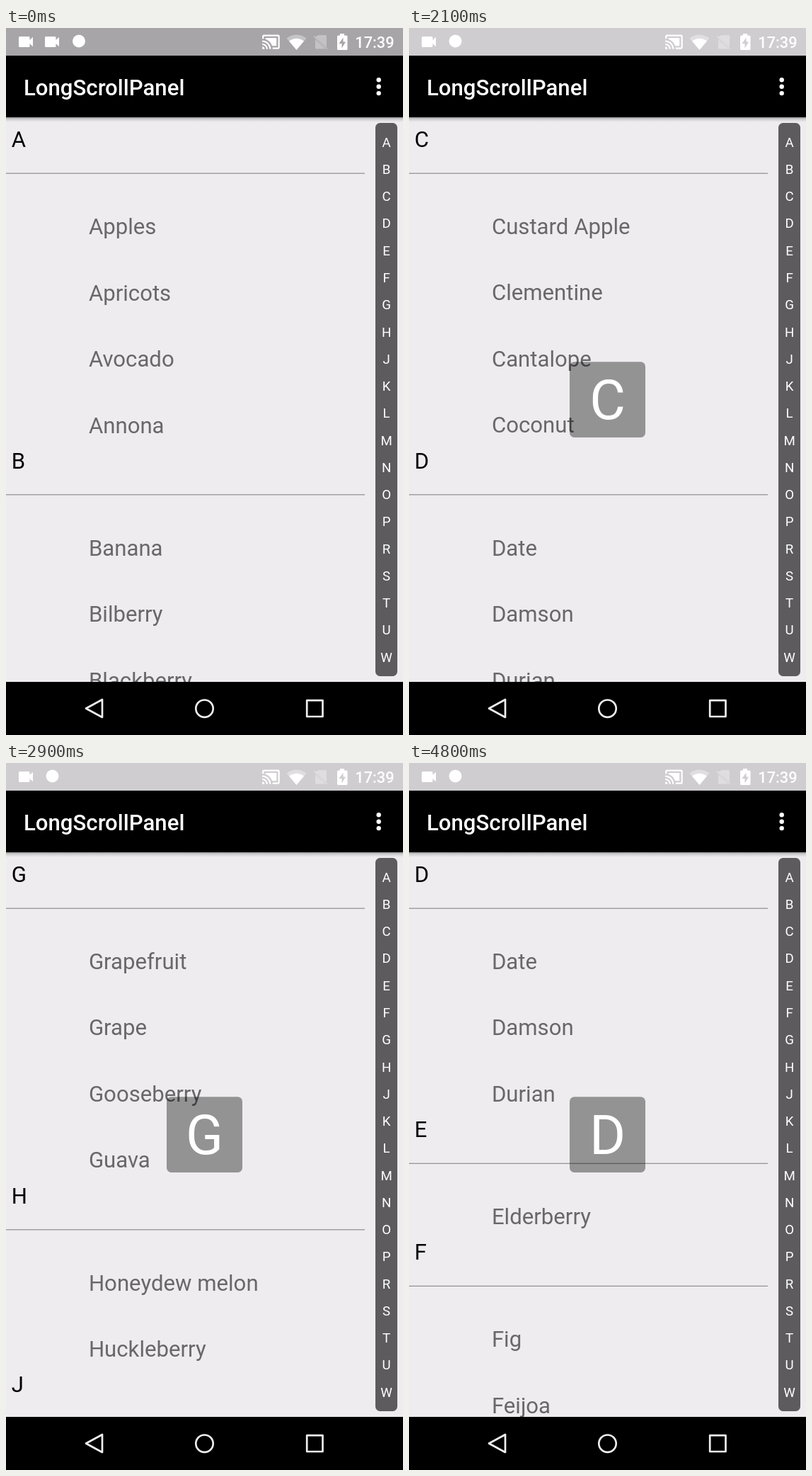
Animation of 561x998 px, one loop 5.1 s. Source, as an HTML page:

```html
<!DOCTYPE html>
<html lang="en">
<head>
<meta charset="utf-8">
<title>Fruit index</title>
<style>
html, body { margin: 0; width: 100%; height: 100%; overflow: hidden; background: #eeecef; }
svg { display: block; width: 561px; height: 998px; font-family: Roboto, "Noto Sans", sans-serif; }
.row { font-size: 31.17px; }
.item { fill: #69676a; }
.side { font-size: 18.7px; fill: #fff; text-anchor: middle; }
</style>
</head>
<body>
<svg viewBox="0 0 561 998" xmlns="http://www.w3.org/2000/svg">
  <defs>
    <linearGradient id="shade" x1="0" y1="0" x2="0" y2="1">
      <stop offset="0" stop-color="#000" stop-opacity=".36"/>
      <stop offset=".4" stop-color="#000" stop-opacity=".12"/>
      <stop offset="1" stop-color="#000" stop-opacity="0"/>
    </linearGradient>
    <path id="camera" d="M1.5 0H14q1.5 0 1.5 1.5V5L20 .8V14.2L15.5 10V13.500q0 1.500-1.500 1.500H1.500Q0 15 0 13.500V1.500Q0 0 1.500 0Z"/>
  </defs>
  <rect width="561" height="998" fill="#eeecef"/>
  <g id="list"></g>
  <rect y="126" width="561" height="7" fill="url(#shade)"/>

  <rect x="522" y="134" width="31" height="781" rx="6.500" fill="#5d5b5e"/>
  <g id="index"></g>

  <g id="bubble">
    <rect x="227" y="471.300" width="107" height="106.700" rx="6.500" fill="#000" fill-opacity=".38"/>
    <text id="big" x="280.500" y="552" font-size="77.900" fill="#fff" text-anchor="middle"></text>
  </g>

  <rect id="status" width="561" height="39.500"/>
  <g fill="#fff">
    <use href="#camera" x="18" y="12"/>
    <use id="second" href="#camera" x="55" y="12"/>
    <circle id="dot" cy="18.500" r="9"/>
    <path transform="translate(361 6.200) scale(1.120)" d="M1 18v3h3c0-1.660-1.340-3-3-3zm0-4v2c2.760 0 5 2.240 5 5h2c0-3.870-3.130-7-7-7zm18-7H5v1.630c3.960 1.280 7.090 4.410 8.370 8.370H19V7zM1 10v2c4.970 0 9 4.030 9 9h2c0-6.080-4.930-11-11-11zm20-7H3c-1.100 0-2 .9-2 2v3h2V5h18v14h-7v2h7c1.100 0 2-.9 2-2V5c0-1.100-.9-2-2-2z"/>
    <path d="M396.500 14.500Q410.500 4.500 424.500 14.500L410.500 31Z" opacity=".35"/>
    <path d="M400 18.500Q410.500 11 421 18.500L410.500 31Z"/>
    <path d="M442 10H451.500Q453 10 453 11.500V27L437 12.500ZM437 16L451.500 29.500H438.500Q437 29.500 437 28Z" opacity=".33"/>
    <path d="M435 11.500L454 30" stroke="#fff" stroke-width="1.500" opacity=".33"/>
    <path d="M472 8H478V10.500H481Q482.500 10.500 482.500 12V29.500Q482.500 31 481 31H469.500Q468 31 468 29.500V12Q468 10.500 469.500 10.500H472Z"/>
    <path id="bolt" d="M476.500 13.500L470.500 22H474.500V28.500L480 19.500H476.500Z"/>
    <text x="493.300" y="27.700" font-size="21.800" font-weight="500">17:39</text>
  </g>

  <rect y="39" width="561" height="87" fill="#000"/>
  <text x="24.900" y="95.200" font-size="31.170" font-weight="500" fill="#fff">LongScrollPanel</text>
  <g fill="#fff">
    <circle cx="526.700" cy="73.300" r="3.200"/>
    <circle cx="526.700" cy="82.700" r="3.200"/>
    <circle cx="526.700" cy="92.100" r="3.200"/>
  </g>

  <rect y="923" width="561" height="75" fill="#000"/>
  <g fill="none" stroke="#eee" stroke-width="2.700" stroke-linejoin="round">
    <path d="M113 960.500L136 948V973Z"/>
    <circle cx="280.500" cy="960.700" r="12.200"/>
    <rect x="425.200" y="949.200" width="22.300" height="22.800"/>
  </g>
</svg>
<script>
const LOOP = 5100, TOP = 126.2, HEAD = 79.6, ROW = 93.5;
const fruit = {
  A: ["Apples", "Apricots", "Avocado", "Annona"],
  B: ["Banana", "Bilberry", "Blackberry"],
  C: ["Custard Apple", "Clementine", "Cantalope", "Coconut"],
  D: ["Date", "Damson", "Durian"],
  E: ["Elderberry"],
  F: ["Fig", "Feijoa"],
  G: ["Grapefruit", "Grape", "Gooseberry", "Guava"],
  H: ["Honeydew melon", "Huckleberry"],
  J: []
};
// start time and section jumped to
const jumps = [
  [0, "A"], [1800, "B"], [2100, "C"], [2300, "D"], [2600, "E"], [2700, "F"],
  [2900, "G"], [4100, "F"], [4400, "E"], [4800, "D"]
];

const $ = id => document.getElementById(id);

function add(parent, tag, attrs, text = "") {
  const el = document.createElementNS("http://www.w3.org/2000/svg", tag);
  for (const key in attrs) el.setAttribute(key, attrs[key]);
  el.textContent = text;
  parent.appendChild(el);
}

const offset = {};
let y = 0;
for (const [letter, names] of Object.entries(fruit)) {
  offset[letter] = y;
  const top = TOP + y;
  add($("list"), "text", { class: "row", x: 7.8, y: top + 41.8 }, letter);
  add($("list"), "rect", { y: top + 78.4, width: 507, height: 1.2, fill: "#8f8d90" });
  names.forEach((name, i) =>
    add($("list"), "text", { class: "row item", x: 116.9, y: top + HEAD + i * ROW + 85.2 }, name));
  y += HEAD + names.length * ROW;
}

[..."ABCDEFGHJKLMNOPRSTUW"].forEach((letter, i) =>
  add($("index"), "text", { class: "side", x: 537.6, y: 167.7 + i * 38.26 }, letter));

function draw(t) {
  const letter = jumps.filter(j => j[0] <= t).pop()[1];
  const first = t < 100;
  const tone = first ? "#a7a5a8" : "#cfcdd0";
  $("list").setAttribute("transform", `translate(0 ${-offset[letter]})`);
  $("bubble").setAttribute("visibility", letter === "A" ? "hidden" : "visible");
  $("big").textContent = letter;
  $("status").setAttribute("fill", tone);
  $("bolt").setAttribute("fill", tone);
  $("second").setAttribute("visibility", first ? "visible" : "hidden");
  $("dot").setAttribute("cx", first ? 103 : 65.5);
}

function tick() {
  draw(performance.now() % LOOP);
  requestAnimationFrame(tick);
}
tick();
</script>
</body>
</html>
```
